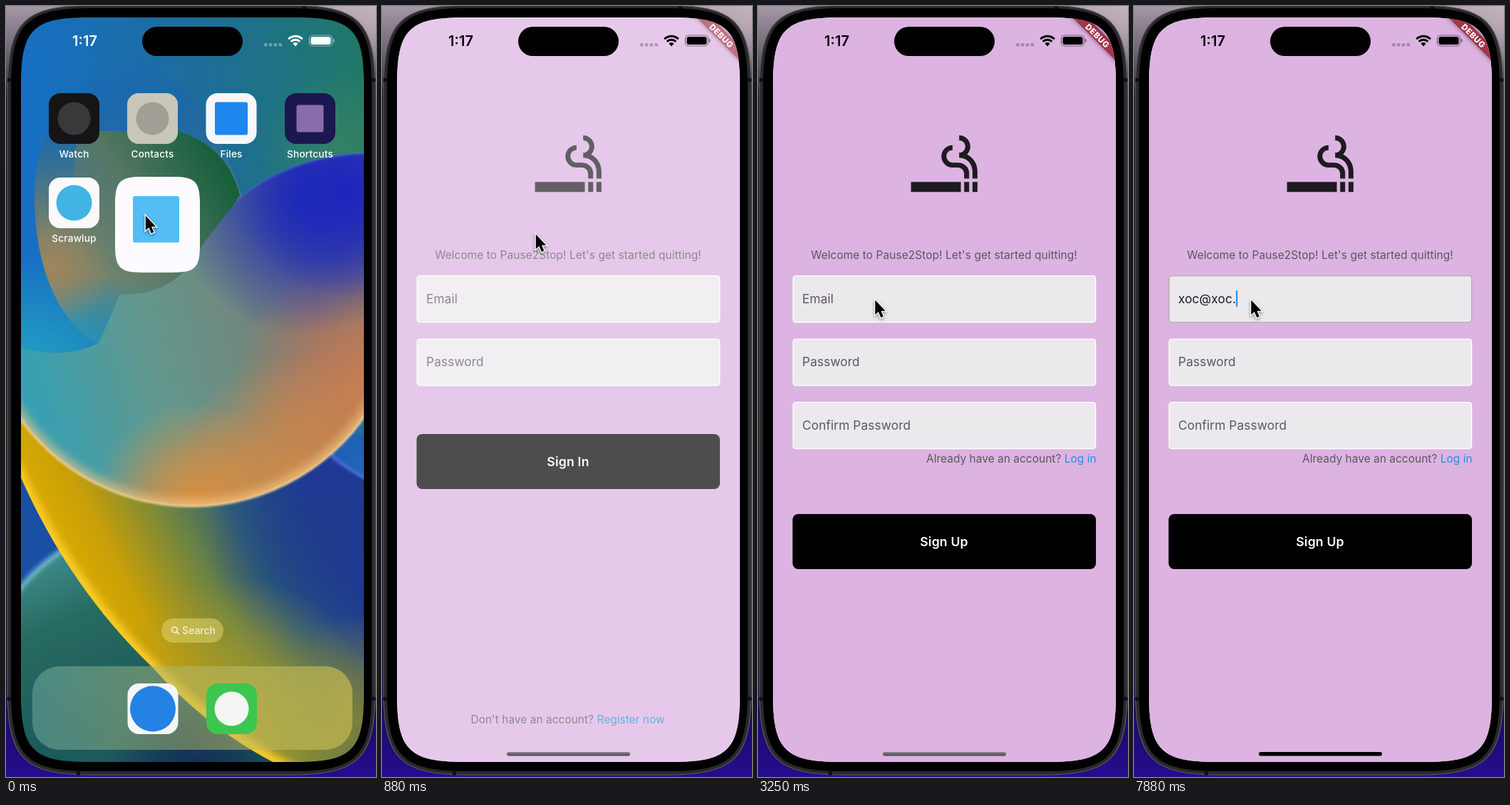
Write an HTML page with a canvas that moves like this. It is 519 px wide and 1079 px high and loops after 8000 ms.

```html
<!DOCTYPE html>
<html lang="en">
<head>
<meta charset="utf-8">
<title>Sign up demo</title>
<style>
html, body { margin: 0; width: 519px; height: 1079px; overflow: hidden; background: #000; }
canvas { display: block; }
</style>
</head>
<body>
<canvas id="stage" width="519" height="1079"></canvas>
<script>
const W = 519, H = 1079, LOOP = 8000;
const SCREEN = { l: 21, t: 16, r: 502, b: 1058 };
const INK = '#1d1b20', GREY = '#5b575e', LINK = '#2492e0', PINK = '#dcb3e1';
const main = document.getElementById('stage').getContext('2d');
let g = main;

const clamp = v => Math.max(0, Math.min(1, v));
const smooth = v => { v = clamp(v); return v * v * (3 - 2 * v); };
const mix = (a, b, k) => a + (b - a) * k;

function box(x, y, w, h, r, fill, stroke, lw = 1) {
  g.beginPath();
  g.roundRect(x, y, w, h, r);
  if (fill) { g.fillStyle = fill; g.fill(); }
  if (stroke) { g.strokeStyle = stroke; g.lineWidth = lw; g.stroke(); }
}

// Rectangle with continuous corners: the curve starts early and meets the circle of radius r halfway
function squircle(l, t, r, b, radius) {
  const e = radius * 1.528, c = radius * .272, p = new Path2D();
  p.moveTo(l + e, t);
  p.lineTo(r - e, t);
  p.bezierCurveTo(r - c, t, r, t + c, r, t + e);
  p.lineTo(r, b - e);
  p.bezierCurveTo(r, b - c, r - c, b, r - e, b);
  p.lineTo(l + e, b);
  p.bezierCurveTo(l + c, b, l, b - c, l, b - e);
  p.lineTo(l, t + e);
  p.bezierCurveTo(l, t + c, l + c, t, l + e, t);
  p.closePath();
  return p;
}

function disc(x, y, r, fill) {
  g.fillStyle = fill;
  g.beginPath();
  g.arc(x, y, r, 0, 7);
  g.fill();
}

function text(s, x, y, size, fill, { weight = 400, align = 'left', gap = 0 } = {}) {
  g.font = `${weight} ${size}px Inter, "Open Sans", sans-serif`;
  g.letterSpacing = gap + 'px';
  g.textAlign = align;
  g.fillStyle = fill;
  g.fillText(s, x, y);
  return g.measureText(s).width;
}

function linear(x0, y0, x1, y1, stops) {
  const grad = g.createLinearGradient(x0, y0, x1, y1);
  stops.forEach(([k, c]) => grad.addColorStop(k, c));
  return grad;
}

// Soft coloured glow, given as "r,g,b"
function glow(x, y, r, rgb, a = 1) {
  const grad = g.createRadialGradient(x, y, 0, x, y, r);
  grad.addColorStop(0, `rgba(${rgb},${a})`);
  grad.addColorStop(.45, `rgba(${rgb},${a * .65})`);
  grad.addColorStop(1, `rgba(${rgb},0)`);
  g.fillStyle = grad;
  g.fillRect(x - r, y - r, 2 * r, 2 * r);
}

function within(path, draw) {
  g.save();
  g.clip(path);
  draw();
  g.restore();
}

function layer(draw) {
  const c = document.createElement('canvas');
  c.width = W;
  c.height = H;
  g = c.getContext('2d');
  draw();
  g = main;
  return c;
}

function rim(d, color, w, blur = 2) {
  g.save();
  g.filter = `blur(${blur}px)`;
  g.strokeStyle = color;
  g.lineWidth = w;
  g.stroke(new Path2D(d));
  g.restore();
}

const wallpaper = layer(() => {
  g.fillStyle = linear(21, 100, 502, 60, [[0, '#1670c4'], [.5, '#1d6c9c'], [1, '#1f7868']]);
  g.fillRect(0, 0, W, H);
  glow(30, 540, 190, '38,170,195', .9);
  glow(470, 200, 120, '70,140,90', .5);

  // Curl behind the icons, fading out at both ends
  within(new Path2D('M190 75C110 90 40 160 40 265C40 360 70 440 130 475L300 400L330 265Q290 130 190 75Z'), () => {
    g.fillStyle = linear(100, 80, 100, 475, [[0, 'rgba(22,92,185,.1)'], [.25, 'rgba(36,104,160,.7)'],
      [.5, '#5b7a78'], [.75, '#71836e'], [1, 'rgba(60,160,170,.3)']]);
    g.fillRect(0, 0, W, H);
    glow(65, 365, 85, '175,135,85', .75);
  });

  // Lower area behind the ball
  g.fillStyle = '#1a4fa6';
  g.fillRect(0, 600, W, H);
  const hill = new Path2D('M0 840Q35 785 95 752L420 1079H0Z');
  within(hill, () => {
    g.fillStyle = linear(40, 770, 140, 1000, [[0, '#3f8f92'], [.4, '#276b60'], [1, '#1d5a5c']]);
    g.fillRect(0, 700, W, H);
    glow(270, 1075, 130, '16,40,84', .9);
  });
  rim('M0 842Q35 787 90 755', '#7cc0d8', 6, 3);
  glow(502, 640, 110, '34,104,190', .9);
  const band = new Path2D('M0 540L21 660Q90 815 205 925Q300 1030 420 1079H519V672Q470 645 450 622Z');
  within(band, () => {
    g.fillStyle = linear(60, 800, 400, 620, [[0, '#e4b000'], [.25, '#c79f08'], [.5, '#6f8540'], [.72, '#2c5f78'], [1, '#1f38a0']]);
    g.fillRect(0, 500, W, H);
    glow(470, 740, 190, '30,58,136', .85);
    glow(320, 1000, 200, '170,156,40', .8);
    glow(500, 1000, 150, '140,135,45', .8);
    rim('M10 640Q90 815 205 925T420 1079', '#ffd02c', 16, 6);
  });
  rim('M455 628Q480 650 519 668', '#5570d8', 4);

  const ball = new Path2D('M275 335C310 262 400 205 519 206V549A297 297 0 0 1 0 546V470Q70 500 130 472L160 403A113 113 0 0 0 275 335Z');
  within(ball, () => {
    g.fillStyle = linear(30, 500, 430, 400, [[0, '#38a0b2'], [.4, '#62988e'], [.7, '#6f8a80'], [1, '#71707c']]);
    g.fillRect(0, 200, W, 520);
    glow(510, 530, 190, '208,126,76', .95);
    glow(270, 705, 150, '226,142,60', 1);
    glow(400, 650, 160, '222,138,64', .8);
    glow(420, 270, 190, '30,48,180', 1);
    glow(480, 260, 150, '26,34,190', .9);
    rim('M0 546A297 297 0 0 0 519 549', 'rgba(244,200,130,.7)', 18, 7);
  });
  rim('M0 546A297 297 0 0 0 519 549', '#f2cf92', 3, 1.5);
  rim('M275 335C310 262 400 205 519 206', '#3f68d0', 2, 1.5);

  // Dark round end of the curl, clear on its left side
  within(new Path2D('M318 280Q300 302 275 335A113 113 0 0 1 160 403Q110 396 80 380L100 175H240Q310 195 328 265Z'), () => {
    g.fillStyle = linear(110, 360, 310, 240, [[0, 'rgba(110,130,105,0)'], [.45, '#557763'], [1, '#17603c']]);
    g.fillRect(0, 0, W, H);
  });
});

const MARKS = {
  round: (x, y, c, r) => disc(x + 35.5, y + 35.5, r, c),
  square: (x, y, c, r) => box(x + 35.5 - r, y + 35.5 - r, 2 * r, 2 * r, 3, c)
};

function app(x, y, tile, mark, color, r, label) {
  box(x, y, 71, 71, 16, tile);
  MARKS[mark](x, y, color, r);
  if (label) text(label, x + 35.5, y + 90, 13.6, '#fff', { align: 'center', gap: .2, weight: 500 });
}

const icons = layer(() => {
  app(60, 122, '#151416', 'round', '#39383b', 23, 'Watch');
  app(170, 122, '#c9c6ba', 'round', '#a19f95', 23, 'Contacts');
  app(280.5, 122, '#f7f7fa', 'square', '#1f87ee', 23, 'Files');
  app(391, 122, '#1b1750', 'square', '#8a6cae', 19, 'Shortcuts');
  app(60, 240, '#fafafa', 'round', '#41b4e4', 25, 'Scrawlup');
  box(218, 857, 87, 34, 17, 'rgba(222,212,110,.55)');
  g.strokeStyle = '#f4efd0';
  g.lineWidth = 1.8;
  g.beginPath();
  g.arc(236.5, 873, 3.8, 0, 7);
  g.moveTo(239.5, 876);
  g.lineTo(242.5, 879);
  g.stroke();
  text('Search', 247, 879, 14, '#f4efd0', { weight: 500 });
  box(37, 924, 449, 117, 38, linear(37, 0, 486, 0, [[0, 'rgba(110,170,160,.55)'], [.5, 'rgba(180,186,110,.5)'], [1, 'rgba(206,190,80,.65)']]));
  app(170.5, 948, '#f5f6f8', 'round', '#2482e4', 32);
  app(281, 948, '#3cc650', 'round', '#f4f6f4', 24);
});

function status(color, dots) {
  text('1:17', 110.5, 56, 20, color, { weight: 600, align: 'center' });
  for (let i = 0; i < 4; i++) box(362 + i * 6.8, 52, 4.6, 4.4, 1.5, dots);
  g.strokeStyle = color;
  g.lineWidth = 3;
  [13.8, 8.8].forEach(r => {
    g.beginPath();
    g.arc(406, 56, r, -2.36, -.78);
    g.stroke();
  });
  g.fillStyle = color;
  g.beginPath();
  g.moveTo(406, 56.5);
  g.arc(406, 56, 5, -2.36, -.78);
  g.fill();
  g.save();
  g.globalAlpha *= .5;
  box(425.5, 41, 32, 15, 4.6, null, color, 1.2);
  box(459, 46, 1.6, 5, 1, color);
  g.restore();
  box(427.5, 43, 28, 11, 3, color);
}

function homeBar(solid) {
  box(175, 1044, 173, 5.5, 2.8, solid ? '#000' : linear(0, 1044, 0, 1050, [[0, '#8d8790'], [1, '#444046']]));
}

const cigarette = new Path2D('M2 16h15v3H2zm18.5 0H22v3h-1.5zM18 16h1.5v3H18zm.85-8.27c.62-.61 1-1.45 1-2.38C19.85 3.5 18.35 2 16.5 2v1.5c1.02 0 1.85.83 1.85 1.85S17.52 7.2 16.5 7.2v1.5c2.24 0 4 1.83 4 4.07V15H22v-2.24c0-2.22-1.28-4.14-3.15-5.03zm-2.82 2.47H14.5c-1.02 0-1.85-.98-1.85-2s.83-1.75 1.85-1.75v-1.5c-1.85 0-3.35 1.5-3.35 3.35s1.5 3.35 3.35 3.35h1.53c1.05 0 1.97.74 1.97 2.05V15h1.5v-1.64c0-1.81-1.46-3.16-3.47-3.16z');

function field(y, label, focus) {
  box(49.2, y + .6, 424.4, 65, 4, '#ebe9ec', focus ? '#b3aeb3' : '#fff', 1.3);
  if (label) text(label, 62, y + 38.5, 17.3, GREY, { gap: .1 });
}

function button(y, label) {
  box(48.5, y, 425.5, 77, 8, '#000');
  text(label, 261, y + 44.5, 17.6, '#fff', { weight: 600, align: 'center', gap: .2 });
}

function prompt(ask, link, x, y) {
  const w = text(ask + ' ', x, y, 15.4, GREY, { gap: .06 });
  text(link, x + w, y, 15.4, LINK, { gap: .06 });
}

function banner() {
  g.save();
  g.translate(475.5, 42.5);
  g.rotate(Math.PI / 4);
  g.shadowColor = 'rgba(0,0,0,.5)';
  g.shadowBlur = 6;
  g.fillStyle = '#a3364a';
  g.fillRect(-60, -9, 120, 14.5);
  g.shadowBlur = 0;
  text('DEBUG', 0, 3.2, 11.4, '#fff', { weight: 800, align: 'center', gap: .5 });
  g.restore();
}

// Typing: each entry is the time its character appears
const ENTRY = 'xoc@xoc.';
const KEYS = [5380, 5500, 5630, 6630, 6750, 6880, 7000, 7880];
// Caret blink: [time, opacity]
const BLINK = [[3500, .6], [3630, 1], [4000, .5], [4130, 0], [4380, .5], [4500, 1], [5000, .9], [5130, 0],
  [5380, 1], [6000, .5], [6130, 0], [6630, 1], [7500, .5], [7630, 0], [7880, 1]];

function emailField(t) {
  const typed = ENTRY.slice(0, KEYS.filter(k => t >= k).length);
  field(377, typed ? '' : 'Email', t >= 3500);
  const w = typed ? text(typed, 62, 415.5, 17.3, INK, { gap: .1 }) : 0;
  const step = BLINK.filter(b => t >= b[0]).pop();
  if (!step) return;
  g.save();
  g.globalAlpha *= step[1];
  box(62 + w, 398, 2.3, 23, 1, '#2196f3');
  g.restore();
}

function page(t) {
  g.fillStyle = PINK;
  g.fillRect(0, 0, W, H);
  g.save();
  g.translate(205.3, 171.7);
  g.scale(4.66, 4.66);
  g.fillStyle = INK;
  g.fill(cigarette);
  g.restore();
  text("Welcome to Pause2Stop! Let's get started quitting!", 261, 354, 15.4, GREY, { align: 'center', gap: .1 });
  emailField(t);
  field(465.5, 'Password');
  if (t < 2380) {
    button(599, 'Sign In');
    prompt("Don't have an account?", 'Register now', 124.5, 1003.5);
  } else {
    field(554, 'Confirm Password');
    prompt('Already have an account?', 'Log in', 236, 639);
    button(711, 'Sign Up');
  }
  banner();
}

const pageLayer = document.createElement('canvas');
pageLayer.width = W;
pageLayer.height = H;

function fadePage(t) {
  const alpha = smooth((t - 690) / 300);
  if (!alpha) return;
  g = pageLayer.getContext('2d');
  page(t);
  g = main;
  g.save();
  g.globalAlpha = alpha;
  g.drawImage(pageLayer, 0, 0);
  g.restore();
}

function home(t) {
  const k = clamp(t / 130), s = mix(1, .94, k);
  g.save();
  if (k) g.filter = `blur(${14 * k}px)`;
  g.drawImage(wallpaper, 0, 0);
  g.translate(261, 537);
  g.scale(s, s);
  g.translate(-261, -537);
  g.globalAlpha = mix(1, .6, k);
  g.drawImage(icons, 0, 0);
  g.restore();
  g.fillStyle = `rgba(0,0,0,${.42 * k})`;
  g.fillRect(0, 0, W, H);
  g.save();
  g.globalAlpha = mix(1, .5, k);
  status('#fff', 'rgba(255,255,255,.35)');
  g.restore();
}

// The launch card: each edge closes in on the screen edge at its own rate
function card(t) {
  const edge = (from, to, left) => to + (from - to) * Math.pow(left, t / 130);
  const l = edge(153, SCREEN.l, .18), r = edge(272, SCREEN.r, .18);
  const top = edge(239, SCREEN.t, .31), b = edge(373, SCREEN.b, .225);
  const s = (r - l) / (SCREEN.r - SCREEN.l);
  g.fillStyle = '#fdfbff';
  g.fill(squircle(l, top, r, b, t ? 62 : 25));
  if (!t) return box(178, 266, 65, 65, 3, '#54bdf5');
  const scaled = (y, anchor, draw) => {
    g.save();
    g.translate(l, y);
    g.scale(s, s);
    g.translate(-SCREEN.l, -anchor);
    draw();
    g.restore();
  };
  scaled(top, SCREEN.t, () => status('#000', 'rgba(0,0,0,.25)'));
  scaled(b, SCREEN.b, () => homeBar(false));
}

function phone() {
  g.fillStyle = linear(0, 0, 0, H, [[0, '#a598a6'], [.08, '#5b5360'], [.12, '#18161c'], [.85, '#17122c'], [.95, '#200b74'], [1, '#270c8e']]);
  g.fillRect(0, 0, W, H);
  glow(W, 0, 110, '205,186,196', .8);
  const body = squircle(2, -1, 518, 1076, 80);
  g.fillStyle = '#2a2a2c';
  g.fill(body);
  g.strokeStyle = '#5a5a5e';
  g.lineWidth = 1.2;
  g.stroke(body);
  g.fillStyle = '#111';
  [[2, 101, 6, 5], [512, 101, 6, 5], [2, 967, 6, 5], [512, 967, 6, 5], [416, 0, 5, 4], [99, 1071, 5, 5]]
    .forEach(r => g.fillRect(...r));
  g.fillStyle = '#000';
  g.fill(squircle(7, 3, 513, 1071, 75));
}

// Pointer path: [start, end, x, y]
const MOVES = [[0, 130, 215, 318], [1130, 1750, 422, 904], [1750, 2130, 352, 996], [2500, 3250, 163.5, 410]];
const arrow = new Path2D('M0 0V20.5L4.6 16.4L8 24.5L11.6 23L8.2 15.2H14.5Z');

function pointer(t) {
  let x = 195, y = 292;
  for (const [a, b, px, py] of MOVES) {
    const k = smooth((t - a) / (b - a));
    x = mix(x, px, k);
    y = mix(y, py, k);
  }
  g.save();
  g.translate(x + .8, y + 1.5);
  g.shadowColor = 'rgba(0,0,0,.4)';
  g.shadowBlur = 4;
  g.shadowOffsetY = 2;
  g.strokeStyle = '#fff';
  g.lineWidth = 2.6;
  g.stroke(arrow);
  g.shadowColor = 'transparent';
  g.fillStyle = '#000';
  g.fill(arrow);
  g.restore();
}

const screenPath = squircle(SCREEN.l, SCREEN.t, SCREEN.r, SCREEN.b, 62);

function render(t) {
  phone();
  within(screenPath, () => {
    if (t < 690) {
      home(t);
      card(t);
    } else {
      g.fillStyle = '#fdfbff';
      g.fillRect(0, 0, W, H);
      fadePage(t);
      status('#000', 'rgba(0,0,0,.25)');
      homeBar(t >= 3630);
    }
  });
  box(191, 29, 141, 41, 20.5, '#000');
  pointer(t);
}

function tick(t) {
  const start = k => Math.round(k * 12.5) * 10;
  const k = Math.floor(t / 125);
  return start(t < start(k) ? k - 1 : k);
}

let last = -1;
function loop() {
  const t = tick(performance.now() % LOOP);
  if (t !== last) render(last = t);
  requestAnimationFrame(loop);
}
loop();
</script>
</body>
</html>
```
